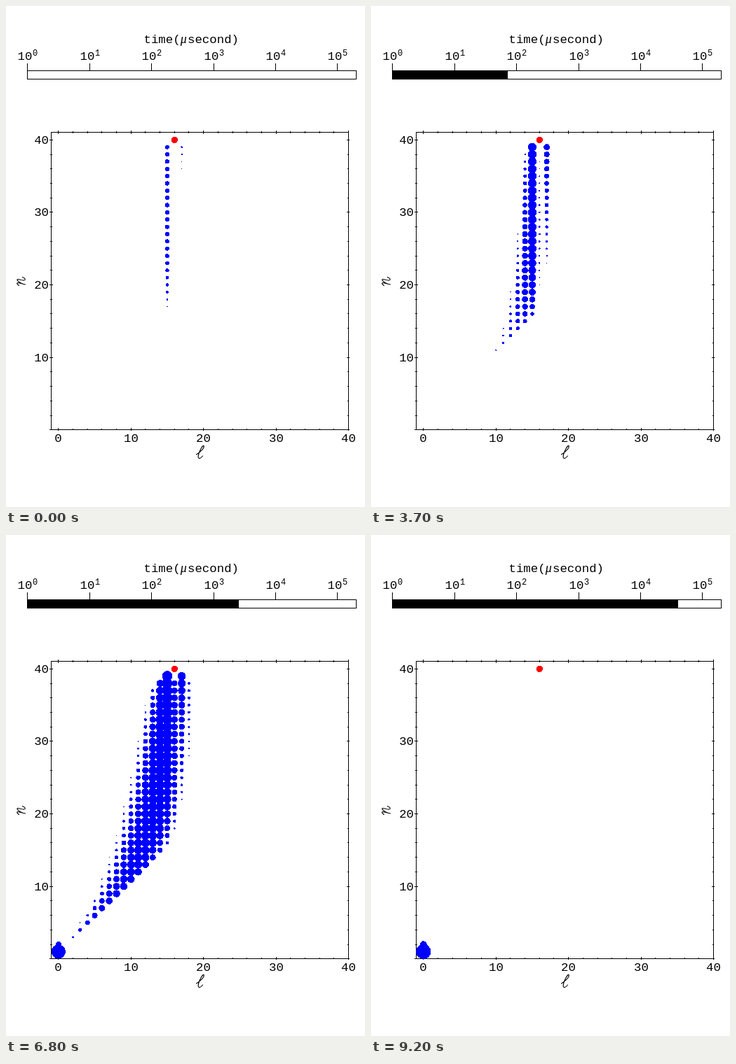
Animation of 512x716 px, one loop 9300 ms. Source, as an HTML page:

```html
<!DOCTYPE html>
<html lang="en">
<head>
<meta charset="utf-8">
<title>Radiative cascade</title>
<style>
  html, body { margin: 0; width: 100%; height: 100%; overflow: hidden; background: #fff; }
  svg { display: block; }
  text { font: 17.4px "Liberation Mono", monospace; fill: #000; }
  .sup { font-size: 12px; }
  .mu { font: italic 18px "Liberation Serif", serif; }
  .line { fill: none; stroke: #000; stroke-width: 1; shape-rendering: crispEdges; }
  .pen { fill: none; stroke: #000; stroke-width: 1.15; stroke-linecap: round; }
  .dots, #bar { shape-rendering: crispEdges; }
</style>
</head>
<body>
<svg id="stage" width="512" height="716" viewBox="0 0 512 716">
  <rect width="512" height="716" fill="#fff"/>
  <text x="196.5" y="53">time(</text>
  <text class="mu" x="248.8" y="53">μ</text>
  <text x="259" y="53">second)</text>
  <g id="axes"></g>
  <rect id="bar" x="30" y="92" width="1" height="12"/>
  <path class="pen" d="M271.5 641C276 638.5 283 632 282.2 628.8C280.8 626.5 276 635.5 274.6 641C273.2 646.5 275.5 649 280.5 643"/>
  <path class="pen" transform="translate(21.5 393.5) rotate(-90)"
    d="M-6-3C-4-6-2-6.5-2-4.5L-4.5 6M-3.6 2C-1-4 3-7.5 3-4.5C3-2 0 4 2 5.5C3.5 6.5 5 4.5 6 2"/>
  <g id="dots" class="dots" fill="#00f"></g>
  <circle class="dots" cx="240.3" cy="191.4" r="4.7" fill="#f00"/>
</svg>
<script>
const NS = 'http://www.w3.org/2000/svg';
const byId = id => document.getElementById(id);
const FRAMES = 93, STEP = 100;
const px = l => 74.84 + l * 10.341;
const py = n => 605.8 - n * 10.363;

function add(parent, tag, attrs, text) {
  const el = document.createElementNS(NS, tag);
  for (const key in attrs) el.setAttribute(key, attrs[key]);
  if (text !== undefined) el.textContent = text;
  parent.appendChild(el);
  return el;
}

function drawAxes() {
  const g = byId('axes');
  const snap = v => Math.floor(v) + 0.5;
  let d = 'M64.5 180.5H488.5V605.5H64.5ZM30.5 92.5H499.5V104.5H30.5Z';
  for (let e = 0; e <= 5; e++) {
    const x = snap(30.95 + 88.37 * e);
    d += `M${x} 82V92`;
    add(g, 'text', { x: x - 14, y: 76.5 }, '10');
    add(g, 'text', { x: x + 7.5, y: 71, class: 'sup' }, e);
  }
  for (let v = 0; v <= 40; v += 2) {
    const major = v % 10 === 0, h = major ? 2.5 : 1.5;
    const x = snap(px(v)), y = snap(py(v));
    d += `M${x} ${180.5 - h}v${2 * h}M${x} ${605.5 - h}v${2 * h - 1}`;
    d += `M${64.5 - h} ${y}h${2 * h}M${488.5 - h} ${y}h${2 * h - 1}`;
    if (!major) continue;
    add(g, 'text', { x: x, y: 622.5, 'text-anchor': 'middle' }, v);
    if (v) add(g, 'text', { x: 61, y: y + 5.5, 'text-anchor': 'end' }, v);
  }
  add(g, 'path', { d, class: 'line' });
}

// Hydrogen radial functions sampled on r = s * s.
const TOP = 40, LMAX = 20, POINTS = 720, DS = 0.1;
const fact = [1];
for (let i = 1; i <= 80; i++) fact[i] = fact[i - 1] * i;
const waves = {};

function wave(n, l) {
  const key = n * 64 + l;
  if (waves[key]) return waves[key];
  const u = new Float64Array(POINTS), deg = n - l - 1, a = 2 * l + 1;
  const norm = Math.sqrt(fact[deg] / fact[n + l]) / n;
  for (let i = 1; i < POINTS; i++) {
    const x = 2 * (i * DS) ** 2 / n;
    let prev = 0, cur = 1;
    for (let k = 0; k < deg; k++) {
      const next = ((2 * k + 1 + a - x) * cur - (k + a) * prev) / (k + 1);
      prev = cur;
      cur = next;
    }
    u[i] = norm * Math.exp(-x / 2) * x ** (l + 1) * cur;
  }
  return waves[key] = u;
}

const weight = Float64Array.from({ length: POINTS }, (_, i) => 2 * (i * DS) ** 3 * DS);

// Spontaneous emission rate per microsecond.
function rate(n, l, m, k) {
  const u = wave(n, l), v = wave(m, k);
  let sum = 0;
  for (let i = 1; i < POINTS; i++) sum += u[i] * v[i] * weight[i];
  const w = (1 / (m * m) - 1 / (n * n)) / 2;
  return 2.142e4 * w ** 3 * Math.max(l, k) / (2 * l + 1) * sum * sum;
}

// Time grid: even up to 1 microsecond, then logarithmic.
const LEAD = 20, SUB = 4;
const times = [];
for (let i = 0; i < LEAD; i++) times.push(i / LEAD);
for (let i = 0; i <= (FRAMES - 1) * SUB; i++) times.push(10 ** (0.05 * i / SUB));

// Solves p' = inflow - loss * p with inflow linear inside each step.
function evolve(inflow, loss, start) {
  const p = new Float64Array(times.length);
  p[0] = start;
  for (let i = 1; i < p.length; i++) {
    const h = times[i] - times[i - 1], x = loss * h;
    const small = x < 1e-4;
    const f1 = small ? 1 - x / 2 : (1 - Math.exp(-x)) / x;
    const f2 = small ? 0.5 - x / 6 : (1 - f1) / x;
    p[i] = p[i - 1] * Math.exp(-x) + h * (inflow[i - 1] * (f1 - f2) + inflow[i] * f2);
  }
  return p;
}

function cascade() {
  const inflow = {}, states = [];
  const id = (n, l) => n * 64 + l;
  inflow[id(TOP, 16)] = new Float64Array(times.length);
  for (let n = TOP; n >= 1; n--) {
    for (let l = 0; l < n && l <= LMAX; l++) {
      const src = inflow[id(n, l)];
      if (!src) continue;
      const exits = [];
      let loss = 0;
      for (let m = n - 1; m >= 1; m--) {
        for (const k of [l - 1, l + 1]) {
          if (k < 0 || k >= m || k > LMAX) continue;
          const a = rate(n, l, m, k);
          loss += a;
          exits.push([id(m, k), a]);
        }
      }
      const p = evolve(src, loss, n === TOP ? 1 : 0);
      for (const [to, a] of exits) {
        const sink = inflow[to] || (inflow[to] = new Float64Array(times.length));
        for (let i = 0; i < p.length; i++) sink[i] += a * p[i];
      }
      if (n < TOP) states.push({ n, l, p });
    }
  }
  return states;
}

// Dot size follows the logarithm of the population, down to one in a million.
function radius(p) {
  return p > 1e-6 ? Math.max(0.72, 1.69 * (6 + Math.log10(p)) + 0.5) : 0;
}

drawAxes();
const dots = cascade().map(({ n, l, p }) => {
  const sizes = [];
  for (let k = 0; k < FRAMES; k++) sizes.push(radius(p[LEAD + k * SUB]));
  return { n, l, sizes };
}).filter(d => d.sizes.some(r => r > 0));
for (const d of dots) d.el = add(byId('dots'), 'circle', { cx: px(d.l), cy: py(d.n), r: 0 });

let shown = -1;
function render(ms) {
  const k = Math.floor(ms / STEP) % FRAMES;
  if (k === shown) return;
  shown = k;
  byId('bar').setAttribute('width', Math.floor(1.9 + 4.42 * k));
  for (const d of dots) d.el.setAttribute('r', d.sizes[k].toFixed(2));
}

function tick() {
  render(performance.now());
  requestAnimationFrame(tick);
}
tick();
</script>
</body>
</html>
```
